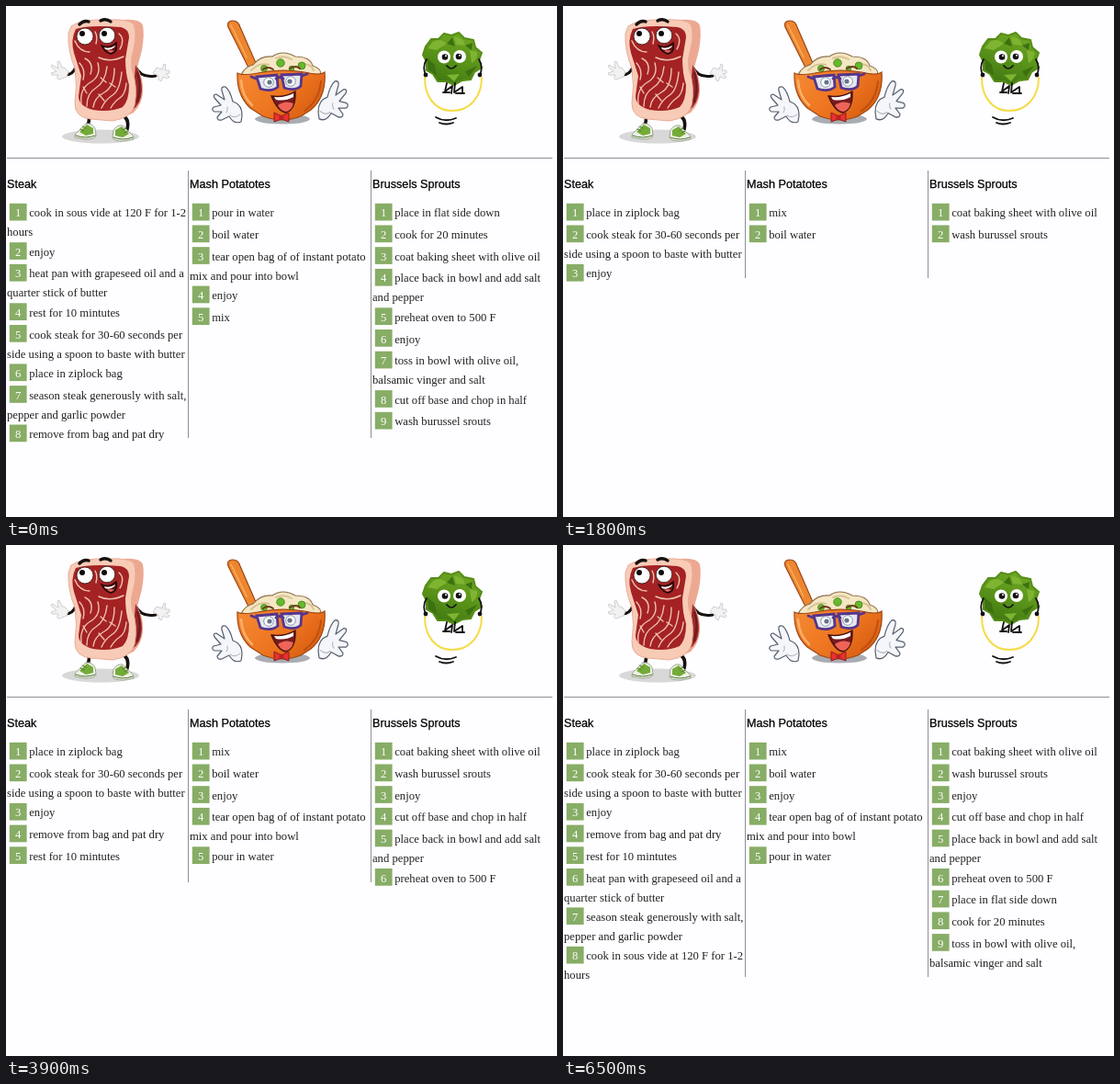
An HTML page that plays this animation: 600 px wide and 556 px high, repeating every 6600 ms.

```html
<!DOCTYPE html>
<html lang="en">
<head>
<meta charset="utf-8">
<title>Dinner steps</title>
<style>
  html, body { margin: 0; width: 100%; height: 100%; overflow: hidden; background: #fefdff; }
  svg { display: block; }
  .title { font: 12.67px "Liberation Sans", Arial, sans-serif; fill: #000; stroke: #000; stroke-width: .25; }
  .step { font: 12.67px "Liberation Serif", Times, serif; fill: #222; }
  .badge { fill: #87ad66; }
  .number { fill: #fff; text-anchor: middle; }
  .rule { stroke: #8e9094; stroke-width: 1; }
  .line { fill: none; stroke-linecap: round; stroke-linejoin: round; }
</style>
</head>
<body>
<svg width="600" height="556" viewBox="0 0 600 556">
  <defs>
    <linearGradient id="bowlFill" x2="1" y2=".6">
      <stop offset="0" stop-color="#f58a35"/><stop offset=".6" stop-color="#ee751f"/><stop offset="1" stop-color="#d95f13"/>
    </linearGradient>
    <linearGradient id="leafFill" x1=".7" x2=".3" y2="1">
      <stop offset="0" stop-color="#6fa824"/><stop offset=".55" stop-color="#569018"/><stop offset="1" stop-color="#3f7612"/>
    </linearGradient>
    <g id="shoe">
      <path d="M1 5Q5-1 11 0L19 8Q24 11 23 15L12 17Q1 17 0 13Z" fill="#eef1e8" stroke="#8b9581" stroke-width=".8"/>
      <path d="M3 5L10 1L18 9L11 13L3 11Z" fill="#74ab38"/>
      <path class="line" d="M11 5L15 3M13 8L17 6M1 13Q11 17 22 13" stroke="#50782d"/>
    </g>
    <g id="glove">
      <path d="M33 30Q33 18 23 15Q20 3 15-1Q10-2 11 3L14 13L5 7Q1 7 3 11L10 19L2 21Q-1 24 3 26L11 26L6 32Q6 36 11 35L19 31Q24 40 32 37Z" fill="#f4f6fa" stroke="#596070" stroke-width="1.2" stroke-linejoin="round"/>
      <path class="line" d="M20 30Q25 34 31 29M17 21Q18 25 16 27" stroke="#a9afbb"/>
    </g>
  </defs>

  <g id="steak">
    <ellipse cx="103" cy="142" rx="42" ry="7.5" fill="#d8d8d8"/>
    <g class="line" stroke="#17110f" stroke-width="3">
      <path d="M76 66Q73 76 62 75M141 66Q147 79 163 76"/>
      <path d="M90 119Q92 128 86 132M124 118Q135 121 132 134" stroke-width="3.6"/>
    </g>
    <g fill="#f2f2f2" stroke="#c5c5c7" stroke-width=".8">
      <path d="M68 72Q64 66 61 67L58 60L56 61L57 68L50 64L49 66L55 71L49 73L50 75L57 75Q54 80 58 80L66 77Z"/>
      <path d="M160 73L164 67L170 69L172 63L174 64L173 70L178 70L178 73L174 74L178 77L176 79L171 77L169 82L166 80L166 76Z"/>
    </g>
    <use href="#shoe" transform="translate(98 128) scale(-1 1)"/>
    <use href="#shoe" x="116" y="130"/>
    <path d="M120 16Q145 12 149 21Q151 31 148 48L143 67Q150 79 149 94Q148 107 139 116L126 122Z" fill="#eda892"/>
    <path d="M141 64Q148 76 148 92Q147 108 137 113Z" fill="#9d2829"/>
    <path class="line" d="M143 73Q148 87 143 104" stroke="#671d1f" stroke-width="2"/>
    <path d="M71 22Q82 14 111 15Q134 14 139 20Q143 29 139 47Q135 57 137 69Q144 88 140 108Q136 122 116 125L92 123Q75 121 75 106Q78 86 75 68Q67 48 68 30Z" fill="#f8cbb7" stroke="#e9ad98"/>
    <path d="M76 25Q91 20 125 23Q134 25 134 34L130 58Q130 73 134 86Q134 103 127 110Q113 116 95 113Q79 109 79 98L82 76L74 51Q70 37 76 25Z" fill="#a42223"/>
    <g class="line" stroke="#efc0b0" stroke-width="1.4">
      <path d="M82 106Q80 90 92 83T100 62M88 109Q88 95 98 89T110 66"/>
      <path d="M95 110Q96 100 107 94T118 68M104 111Q108 102 116 97T126 72"/>
      <path d="M114 111Q118 104 124 100T131 84M80 62Q87 69 84 80M86 57Q96 62 92 74"/>
      <path d="M101 56Q113 62 128 55M84 88L88 95M103 78L109 83M113 84L119 88M101 96L107 103"/>
      <path d="M75 38Q80 50 91 50M97 28Q100 33 98 41M123 30Q130 36 124 47"/>
    </g>
    <g fill="#fff" stroke="#2c1616" stroke-width=".8"><circle cx="86" cy="33" r="9"/><circle cx="110" cy="32" r="8.8"/></g>
    <circle cx="83" cy="30" r="3" fill="#0c0c0c"/><circle cx="107" cy="30" r="3" fill="#0c0c0c"/>
    <g class="line" stroke="#17110f" stroke-width="3.4"><path d="M80 20Q85 15 90 17M103 16Q109 13 114 17"/></g>
    <path d="M104 43Q112 47 120 40Q122 51 114 52Q108 51 104 43Z" fill="#631516" stroke="#1b0808" stroke-width="1.3"/>
    <path d="M107 45Q113 47 119 43L118 45Q113 49 108 47Z" fill="#fff"/>
    <path d="M110 49Q114 47 118 49L114 51Z" fill="#e0665f"/>
  </g>

  <g id="mash">
    <ellipse cx="301" cy="123" rx="30" ry="5.5" fill="#a9acb2"/>
    <use href="#glove" x="224" y="89"/>
    <use href="#glove" transform="translate(373 83) scale(-1 1.08)"/>
    <path d="M242 23Q240 16 247 16Q253 16 255 23L272 62L264 67Z" fill="#ee862f" stroke="#9a4516" stroke-width="1.2"/>
    <path class="line" d="M245 21L262 56" stroke="#f7ad5d" stroke-width="1.6"/>
    <path d="M256 75Q260 66 269 64Q277 54 290 55Q301 47 315 55Q331 55 334 65Q344 68 343 76L329 84L268 84Z" fill="#f5e6c4" stroke="#8c714b" stroke-width="1.1"/>
    <path class="line" d="M267 70Q276 61 286 64M294 57Q303 53 311 58M321 64Q331 61 335 70" stroke="#d8c493" stroke-width="2"/>
    <g fill="#66b82c" stroke="#438521" stroke-width=".8"><circle cx="299" cy="62" r="4.3"/><circle cx="322" cy="65" r="4"/><circle cx="281" cy="68" r="3.5"/><circle cx="311" cy="68" r="2.8"/></g>
    <path d="M252 73Q257 76 274 73Q299 68 325 72Q342 76 347 72Q349 99 332 113L321 120Q301 128 280 120L266 111Q251 97 252 73Z" fill="url(#bowlFill)" stroke="#9b4613" stroke-width="1.2"/>
    <path class="line" d="M256 81Q257 98 268 108" stroke="#fbb069" stroke-width="2.5"/>
    <path class="line" d="M343 82Q341 103 325 114" stroke="#bd4f11" stroke-width="2"/>
    <path class="line" d="M280 69Q285 65 291 69M309 68Q316 64 320 68" stroke="#6a3c1d" stroke-width="2"/>
    <g fill="#e3e7ee" stroke="#55358c" stroke-width="2.8"><path d="M273 77L295 75L296 88Q289 94 277 90Z"/><path d="M300 75L322 74L321 87Q315 93 303 89Z"/></g>
    <path class="line" d="M294 79Q298 76 302 79M272 79L267 77M322 76L328 74" stroke="#55358c" stroke-width="2.8"/>
    <g fill="#fff" stroke="#8c96aa"><circle cx="286" cy="83" r="5.3"/><circle cx="310" cy="82" r="5.3"/></g>
    <circle cx="287" cy="83" r="2.6" fill="#677389"/><circle cx="309" cy="82" r="2.6" fill="#677389"/>
    <path d="M289 98Q303 100 315 93Q316 112 305 116Q296 115 289 98Z" fill="#771b1e" stroke="#42150f" stroke-width="1.3"/>
    <path d="M292 99Q304 100 313 95L313 99Q304 104 294 102Z" fill="#fff"/>
    <path d="M296 108Q304 102 313 106Q311 114 305 115Q299 114 296 108Z" fill="#ef6358"/>
    <path d="M300 120L292 116V126L300 123L308 126V116Z" fill="#e83231" stroke="#911c1b"/><circle cx="300" cy="121" r="2.6" fill="#bd2222"/>
  </g>

  <g id="sprout">
    <path class="line" d="M456 78C456 100 468 114 486 114S518 100 518 78" stroke="#f4dc45" stroke-width="2"/>
    <path d="M457 44L463 36L471 36L477 30L485 32L493 29L499 35L509 37L511 45L518 51L515 59L518 67L510 72L506 80L497 81L488 86L480 82L470 82L465 74L458 70L458 61L454 53Z" fill="url(#leafFill)" stroke="#568d18" stroke-width="2" stroke-linejoin="round"/>
    <path d="M465 39Q473 34 480 41L469 48L459 46ZM488 34Q499 34 500 43L490 42ZM505 48L513 50Q514 58 507 62ZM480 75L494 74L488 82Z" fill="#7eb431"/>
    <path d="M459 57L467 64L469 76L460 69ZM500 71L513 65L504 77ZM480 41L486 34L489 44ZM500 43L508 40L507 48Z" fill="#3c7010"/>
    <g class="line" stroke="#111" stroke-width="1.8">
      <path d="M458 58Q453 66 457 75M515 58Q520 66 516 75"/>
      <path d="M480 84L478 93L486 87L485 95M489 84L488 94L497 88L497 95M476 94L483 94M490 95L499 95"/>
      <path d="M468 121Q478 127 490 122M472 127Q479 130 487 127"/>
    </g>
    <circle cx="457" cy="75" r="2.4" fill="#111"/><circle cx="516" cy="75" r="2.4" fill="#111"/>
    <g fill="#fff"><circle cx="477" cy="55.5" r="7"/><circle cx="494" cy="55" r="7"/></g>
    <circle cx="478" cy="55.5" r="3.3" fill="#111"/><circle cx="493" cy="55" r="3.3" fill="#111"/>
    <circle cx="479" cy="54.3" r="1" fill="#fff"/><circle cx="494" cy="53.8" r="1" fill="#fff"/>
    <path class="line" d="M480 65Q485 71 490 65" stroke="#111" stroke-width="1.7"/>
  </g>

  <path class="rule" d="M1 165.5H595"/>
  <path id="dividers" class="rule"/>
  <g id="columns"></g>
</svg>
<script>
const LOOP = 6600, CLEAR = 600;
const SINGLE = 23.7, DOUBLE = 42.4;

// "before" is the shuffled order left from the previous run; "times" add steps one by one.
const recipes = [
  {
    title: 'Steak', x: 1,
    steps: ['place in ziplock bag', 'cook steak for 30-60 seconds per|side using a spoon to baste with butter',
      'enjoy', 'remove from bag and pat dry', 'rest for 10 mintutes',
      'heat pan with grapeseed oil and a|quarter stick of butter',
      'season steak generously with salt,|pepper and garlic powder', 'cook in sous vide at 120 F for 1-2|hours'],
    before: [7, 2, 5, 4, 1, 0, 6, 3],
    times: [900, 1400, 1700, 2600, 3500, 4000, 4400, 4800]
  },
  {
    title: 'Mash Potatotes', x: 200,
    steps: ['mix', 'boil water', 'enjoy', 'tear open bag of of instant potato|mix and pour into bowl', 'pour in water'],
    before: [4, 1, 3, 2, 0],
    times: [1000, 1600, 2400, 3300, 3700]
  },
  {
    title: 'Brussels Sprouts', x: 399,
    steps: ['coat baking sheet with olive oil', 'wash burussel srouts', 'enjoy', 'cut off base and chop in half',
      'place back in bowl and add salt|and pepper', 'preheat oven to 500 F', 'place in flat side down',
      'cook for 20 minutes', 'toss in bowl with olive oil,|balsamic vinger and salt'],
    before: [6, 7, 0, 4, 5, 2, 8, 3, 1],
    times: [1500, 1700, 2500, 3200, 3600, 3800, 4000, 4200, 4400]
  }
];

const columns = document.getElementById('columns');
const dividers = document.getElementById('dividers');
const text = (kind, x, y, content) => `<text class="${kind}" x="${x}" y="${y}">${content}</text>`;

function visibleSteps({ steps, before, times }, time) {
  return time < CLEAR ? before.map(i => steps[i]) : steps.filter((_, i) => time >= times[i]);
}

function drawColumn(recipe, time) {
  const { title, x } = recipe;
  let height = 0;
  let markup = text('title', x, 197.5, title);
  visibleSteps(recipe, time).forEach((step, i) => {
    const [first, second] = step.split('|');
    const y = 229.3 + height;
    markup += `<rect class="badge" x="${x + 2.8}" y="${y - 14.5}" width="18.8" height="18.7"/>`
      + text('step number', x + 12.2, y, i + 1) + text('step', x + 24.2, y, first);
    if (second) markup += text('step', x, y + 21, second);
    height += second ? DOUBLE : SINGLE;
  });
  return { markup, height };
}

let shown = '';
function frame() {
  const time = performance.now() % LOOP;
  const drawn = recipes.map(recipe => drawColumn(recipe, time));
  const markup = drawn.map(column => column.markup).join('');
  if (markup !== shown) {
    const bottom = Math.round(206 + Math.max(...drawn.map(column => column.height)));
    columns.innerHTML = shown = markup;
    dividers.setAttribute('d', `M198.5 179V${bottom}M397.5 179V${bottom}`);
  }
  requestAnimationFrame(frame);
}
frame();
</script>
</body>
</html>
```
